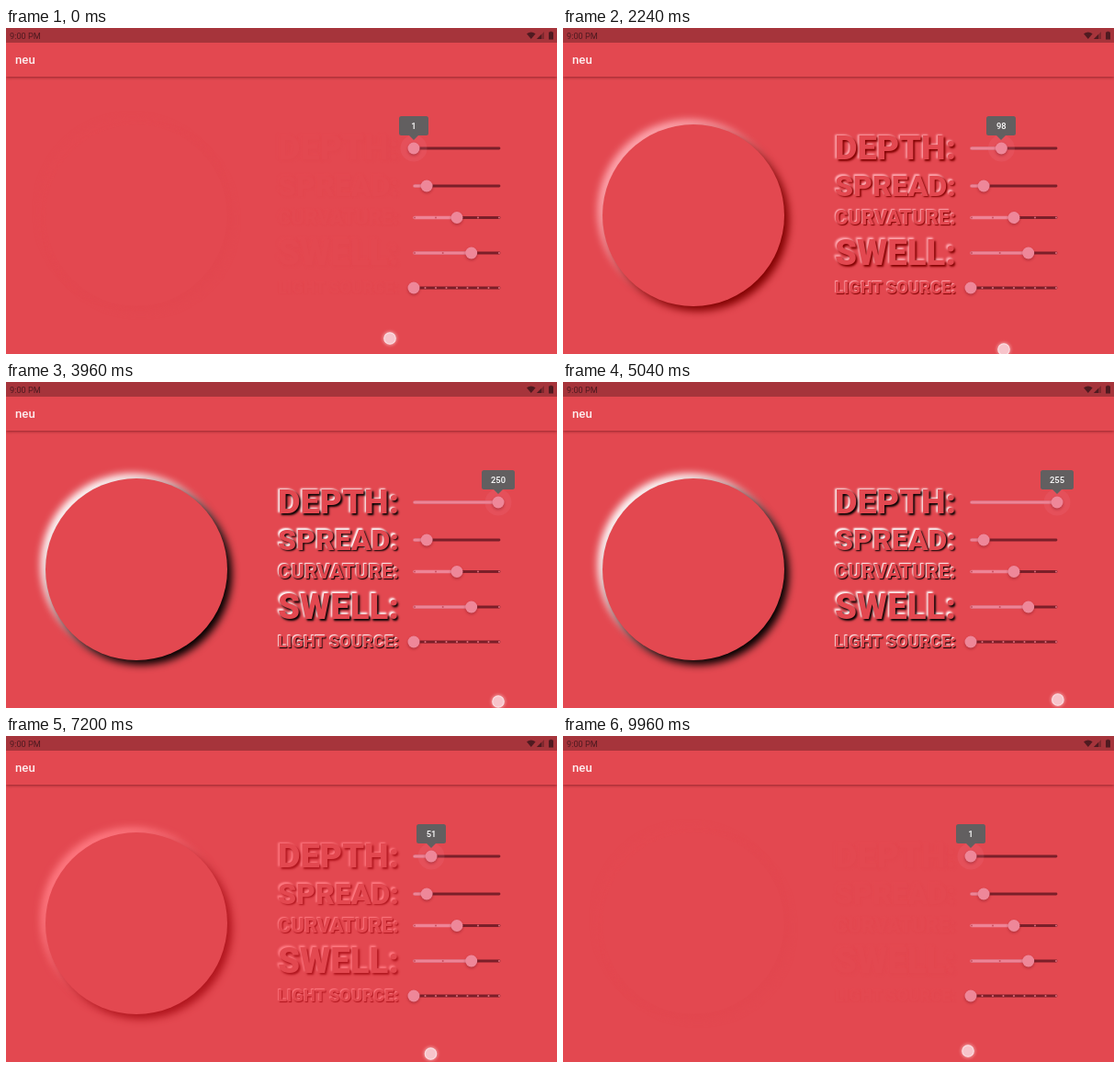
An HTML page for the animation above (10000 ms loop, 600x355 px).

```html
<!DOCTYPE html>
<html lang="en">
<head>
<meta charset="utf-8">
<title>neu</title>
<style>
  :root { --bg: #e34850; --light: #e34850; --dark: #e34850; }
  html, body { margin: 0; width: 100%; height: 100%; overflow: hidden; background: var(--bg); }
  body { font-family: Roboto, sans-serif; }
  #stage { position: relative; width: 600px; height: 355px; overflow: hidden; background: var(--bg); }
  #appbar { position: absolute; left: 0; top: 0; width: 600px; height: 53px; background: var(--bg);
    box-shadow: 0 1px 3px rgba(70, 0, 8, .5); }
  #status { height: 16px; background: #a6343b; color: #4f1a20; font-size: 9.2px; line-height: 17px; text-indent: 4px; }
  #title { position: absolute; left: 10px; top: 25px; line-height: 20px; font-size: 13.2px; font-weight: 500; color: #fdeff0; }
  #disc { position: absolute; left: 43px; top: 105px; width: 198px; height: 198px; border-radius: 50%;
    background: var(--bg); box-shadow: 5px 5px 9px var(--dark), -5px -5px 9px var(--light); }
  .name { position: absolute; left: 296px; transform: translateY(-50%); white-space: nowrap; line-height: 1.2;
    font-weight: 900; color: var(--bg);
    text-shadow: .043em .043em .06em var(--dark), -.043em -.043em .06em var(--light); }
  svg { position: absolute; left: 0; top: 0; }
  #tip { position: absolute; top: 95.5px; min-width: 12px; height: 21.5px; padding: 0 10px; border-radius: 2.5px;
    transform: translateX(-50%); background: #625f60; color: #fff; text-align: center;
    font-size: 9.4px; font-weight: 500; line-height: 21.5px; }
  #tip::after { content: ""; position: absolute; left: 50%; top: 100%; margin-left: -5px;
    border: 5px solid transparent; border-top-color: #625f60; border-bottom: 0; }
</style>
</head>
<body>
<div id="stage">
  <div id="disc"></div>
  <div id="appbar">
    <div id="status">9:00 PM</div>
    <div id="title">neu</div>
  </div>
  <svg id="art" width="600" height="355" viewBox="0 0 600 355">
    <defs>
      <filter id="soft" x="-50%" y="-50%" width="200%" height="200%"><feGaussianBlur stdDeviation="1.4"/></filter>
    </defs>
    <g fill="#4f1a20">
      <path d="M567 6.2Q571.8 2.6 576.6 6.2L571.8 12Z"/>
      <path d="M586 4V12H578Z" opacity=".45"/>
      <path d="M583 7V12H578Z"/>
      <path d="M591 4.6h1.4v-.9h2.2v.9H596V12.4H591Z"/>
    </g>
    <g id="sliders"></g>
    <g id="touch">
      <circle r="8" fill="#fff" opacity=".35" filter="url(#soft)"/>
      <circle r="6.2" fill="#f7c4cb" stroke="#fbdde1" stroke-width="1.2"/>
    </g>
  </svg>
  <div id="tip">1</div>
</div>
<script>
const LOOP = 10000, STEP = 40, LAG = 90;
const LEFT = 444, RIGHT = 538, SPAN = RIGHT - LEFT;
const BASE = [227, 72, 80];
const $ = id => document.getElementById(id);
const clamp = (v, lo, hi) => Math.min(hi, Math.max(lo, v));

// label, centre line, thumb position 0..1, divisions
const rows = [
  ["DEPTH:", 131, 0, 0],
  ["SPREAD:", 172, .15, 0],
  ["CURVATURE:", 206.5, .5, 4],
  ["SWELL:", 245, .667, 3],
  ["LIGHT SOURCE:", 283, 0, 8]
];

function addLabel(text, y) {
  const el = document.createElement("div");
  el.className = "name";
  el.textContent = text;
  el.style.top = y + "px";
  el.style.fontSize = "100px";
  $("stage").append(el);
  el.style.fontSize = 132 / el.offsetWidth * 100 + "px";
}

function slider(y, pos, divisions, first) {
  const x = LEFT + pos * SPAN;
  const line = (id, from, to, color, w) =>
    `<line ${id} x1="${from}" x2="${to}" y1="${y}" y2="${y}" stroke="${color}" stroke-width="${w}" stroke-linecap="round"/>`;
  let out = line("", LEFT + 1, RIGHT - 1, "#7b1f29", 2.8) +
    line(first ? 'id="fill"' : "", LEFT + 1, Math.max(x, LEFT + 1), "#ee8496", 3.6);
  for (let i = 0; divisions && i <= divisions; i++) {
    const tx = LEFT + 1 + (SPAN - 2) * i / divisions;
    out += `<circle cx="${tx}" cy="${y}" r="1" fill="${tx < x ? "#c9505f" : "#e0707f"}"/>`;
  }
  const halo = first ? `<circle r="14.5" fill="#f27f90" opacity=".16"/>` : "";
  return out + `<g ${first ? 'id="thumb"' : ""} transform="translate(${x} ${y})">${halo}
    <circle cy="1.5" r="6.4" fill="#6a0a14" opacity=".4" filter="url(#soft)"/>
    <circle r="6.5" fill="#ee8799"/></g>`;
}

rows.forEach(([text, y]) => addLabel(text, y));
$("sliders").innerHTML = rows.map(([, y, pos, n], i) => slider(y, pos, n, i === 0)).join("");

// finger path: time, x, y
const path = [
  [0, 418, 338], [2240, 480, 350], [2920, 503.4, 351], [3800, 535, 348.5], [3960, 536, 348],
  [4400, 538, 347], [5000, 541, 346], [5640, 479.2, 346], [5900, 466, 346], [7200, 462.5, 346],
  [7900, 452, 345], [8400, 444, 344], [9760, 441, 343], [LOOP, 441, 343]
];

function slope(i, k) {
  const a = path[Math.max(i - 1, 0)], b = path[Math.min(i + 1, path.length - 1)];
  return i === path.length - 2 ? 0 : (b[k] - a[k]) / (b[0] - a[0]);
}

function along(t, k) {
  t = clamp(t, 0, LOOP - 1);
  const i = path.findIndex((p, n) => t < path[n + 1][0]);
  const a = path[i], b = path[i + 1], d = b[0] - a[0], u = (t - a[0]) / d;
  if (i === path.length - 2) return a[k];
  const v = 1 - u;
  return a[k] * (1 + 2 * u) * v * v + slope(i, k) * d * u * v * v +
    b[k] * u * u * (3 - 2 * u) - slope(i + 1, k) * d * u * u * v;
}

const shade = d => `rgb(${BASE.map(c => clamp(c + d, 0, 255)).join()})`;

function draw(now) {
  const t = Math.floor((now % LOOP) / STEP) * STEP;
  const x = along(t, 1);
  const thumbX = clamp(along(t - LAG, 1), LEFT, RIGHT);
  const depth = Math.round(1 + (clamp(x, LEFT, RIGHT) - LEFT) / SPAN * 254);
  const root = document.documentElement.style;
  root.setProperty("--light", shade(depth));
  root.setProperty("--dark", shade(-depth));
  $("thumb").setAttribute("transform", `translate(${thumbX} ${rows[0][1]})`);
  $("fill").setAttribute("x2", Math.max(thumbX, LEFT + 1));
  $("tip").style.left = thumbX + "px";
  $("tip").textContent = depth;
  $("touch").setAttribute("transform", `translate(${x} ${along(t, 2)})`);
}

const start = performance.now();
function loop() {
  draw(performance.now() - start);
  requestAnimationFrame(loop);
}
loop();
</script>
</body>
</html>
```
